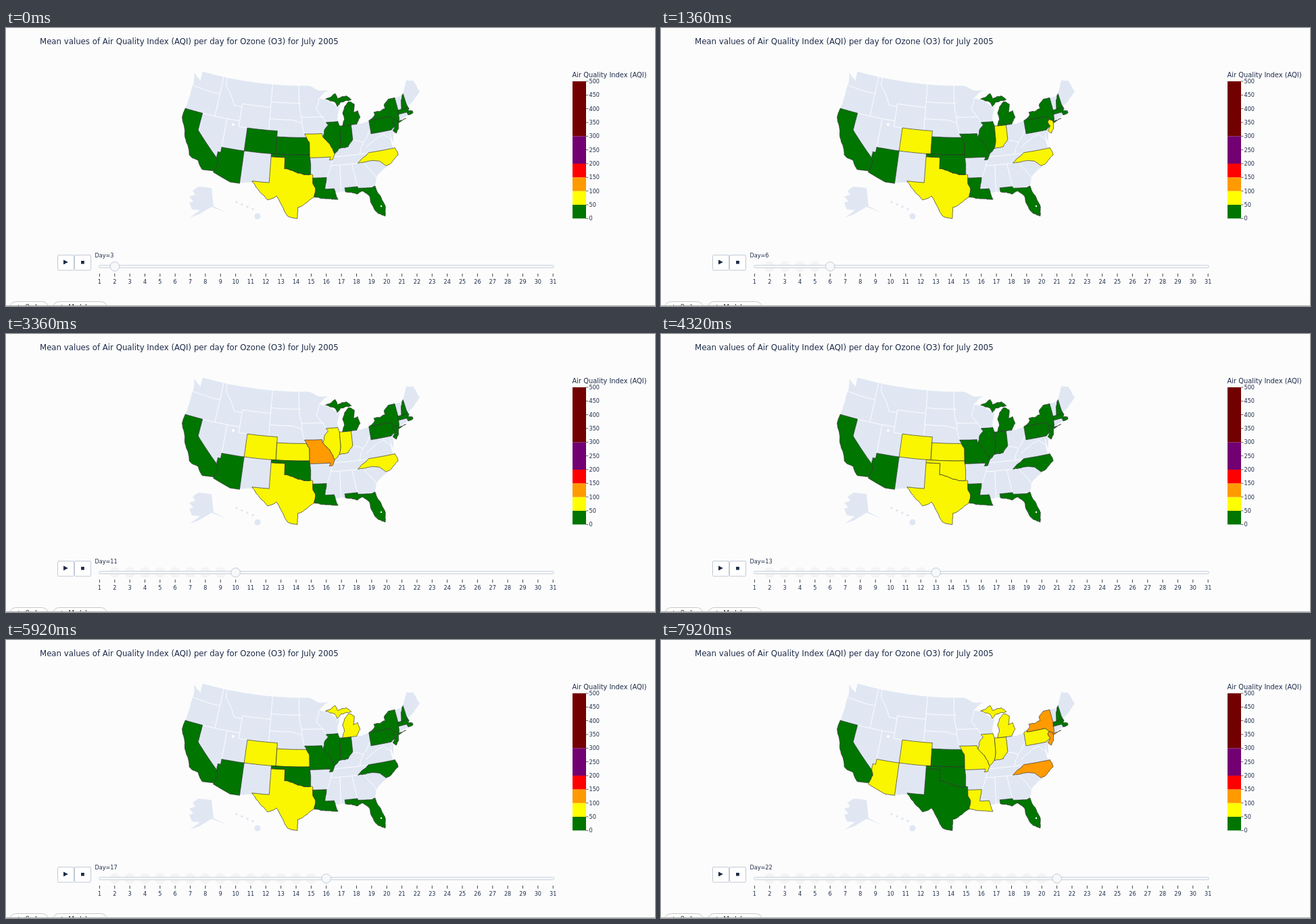
An HTML page that plays this animation: 960 by 412 pixels, repeating every 8 s.

```html
<!DOCTYPE html>
<html lang="en">
<head>
<meta charset="utf-8">
<title>Air quality by day</title>
<style>
html, body { margin: 0; width: 100%; height: 100%; overflow: hidden; background: #fcfcfc; }
svg { display: block; width: 100%; height: 100%; }
text { font-family: "DejaVu Sans", sans-serif; fill: #1d2b48; font-size: 8.1px; }
.mid { text-anchor: middle; }
.pill { font-family: Roboto, sans-serif; font-size: 9.6px; fill: #222; }
</style>
</head>
<body>
<svg id="stage" viewBox="0 0 960 412"></svg>
<script>
const stage = document.getElementById('stage');
const GREEN = '#007500', ORANGE = '#ff9a00';
const LEVELS = { g: GREEN, y: '#f9f600', o: ORANGE };
const LAND = '#e0e7f3', INK = '#1d2b48', EDGE = '#c2cad6';

function add(tag, attrs, text) {
  const el = document.createElementNS('http://www.w3.org/2000/svg', tag);
  for (const key in attrs) el.setAttribute(key, attrs[key]);
  if (text !== undefined) el.textContent = text;
  return stage.appendChild(el);
}
const label = (x, y, text, attrs) => add('text', { x, y, ...attrs }, text);
const rect = (x, y, width, height, attrs) => add('rect', { x, y, width, height, ...attrs });
const dot = (cx, cy, r, attrs) => add('circle', { cx, cy, r, ...attrs });

// Albers conic projection; longitude is given in degrees west
function project([west, lat]) {
  const rad = Math.PI / 180, n = 0.602835;
  const rho = 488 * Math.sqrt(1.35122 - 2 * n * Math.sin(lat * rad)) / n;
  const a = n * (96 - west) * rad;
  return [439.9 + rho * Math.sin(a), rho * Math.cos(a) - 452.2];
}

// Splits an edge at its middle; a natural edge is also bent there.
// The bend depends on the two ends only, so neighbours share it.
function split(a, b, natural, depth) {
  if (!depth) return [b];
  const sx = a[0] + b[0], sy = a[1] + b[1], angle = sx * 91 + sy * 37;
  const bend = natural ? 0.06 * Math.hypot(a[0] - b[0], a[1] - b[1]) : 0;
  const mid = [sx / 2 + bend * Math.sin(angle), sy / 2 + bend * Math.cos(angle)];
  return [...split(a, mid, natural, depth - 1), ...split(mid, b, natural, depth - 1)];
}

// "west lat, west lat": parallels, meridians and edges to "=" points are straight
function trace(points, closed) {
  const names = points.split(',');
  if (closed) names.push(names[0]);
  const list = names.map(p => p.replace('=', '').split(' ').map(Number));
  const out = [list[0]];
  for (let i = 1; i < list.length; i++) {
    const [a, b] = [list[i - 1], list[i]];
    const natural = a[0] !== b[0] && a[1] !== b[1] && names[i][0] !== '=';
    out.push(...split(a, b, natural, 3));
  }
  return 'M' + out.map(p => project(p).map(v => v.toFixed(1)).join(' ')).join('L');
}

label(50, 24, 'Mean values of Air Quality Index (AQI) per day for Ozone (O3) for July 2005', { style: 'font-size:11.76px' });

// land
const coast = '124.7 48.4,122.6 47.3,122.75 49,95.15 49,89.5 48,92.1 46.75,90.4 46.55,87.6 45.1,88 44.5,87.1 45.2,87.9 43,87.5 41.7,83.45 41.7,80.5 42,78.9 42.85,76.2 43.5,75 45,71.5 45,69.25 47.45,67.8 47.07,67 44.85,70.6 43.1,70.6 41.6,73.9 40.8,74.9 38.95,75.4 39.5,75.95 37.15,76.2 39.4,76.35 37,76 35.6,77.95 33.9,80.9 32.05,81.45 30.7,85 30.7,89.5 30.3,93 30,98 28,103 30.5,106.5 31.78,108.2 31.5,111 31.5,114.7 33,117 33,120 35,123.4 39.5,124.2 42,124.05 44.7,124.1 46.9';
add('path', { d: trace(coast, true), fill: LAND });

// Alaska and Hawaii insets
add('path', { d: 'M285 235L304 237 307 264 327 274 304 265 286 276 272 281 287 270 275 269 271 259 277 257 271 250 280 247 276 241Z', fill: LAND });
for (let i = 0; i < 4; i++) dot(341 + 8 * i, 258 + 3.5 * i, 1.8, { fill: LAND });
dot(372, 279, 4.6, { fill: LAND });

// borders between uncoloured states
[
  '117 49,117 42', '124.2 42,111.05 42', '123.95 46.2,=119 45.95,=117 46',
  '114.05 42,114.05 37,103.05 37,103.05 32', '116.05 49,116.05 48,113 44.5,111.05 44.5',
  '104.05 45,111.05 45,111.05 41,102.05 41,102.05 40', '109.05 41,109.05 31.4',
  '104.05 49,104.05 41', '104.05 45.94,96.5 45.94', '104.05 43,98.5 43,96.5 42.5',
  '97.2 49,96.45 43.5,95.77 40.6', '96.45 43.5,91.2 43.5', '92.1 46.75,92.8 44.75,90.65 42.5',
  '89.7 36,91.17 33', '90.1 35,83.1 35,80.9 32.05', '89.5 36.5,75.85 36.5',
  '88.2 35,=88.4 30.35', '85.6 35,=85 31', '84.82 39.1,82.6 38.4,83.7 36.6',
  '82 37.5,77.75 39.3,76.3 38.05', '82.6 38.4,80.52 40.6', '75.8 39.7,=75.05 38.45'
].forEach(p => add('path', { d: trace(p), fill: 'none', stroke: '#fff', 'stroke-width': 0.9 }));

// A state's levels: one letter for each span of days
const SPANS = [2, 4, 7, 11, 14, 17, 20];
const states = [];
function state(levels, ...shapes) {
  const d = shapes.map(p => trace(p, true) + 'Z').join('');
  const el = add('path', { d, stroke: '#333', 'stroke-width': 0.7, 'stroke-linejoin': 'round' });
  states.push({ el, levels });
}
const always = 'ggggggg';
state(always, '124.2 42,120 42,120 39,=114.63 35,114.2 34.2,114.72 32.72,=117.12 32.53,118.4 33.9,120.5 34.45,122.4 37.2,124.3 40.4');
state('gggggyy', '109.05 37,109.05 31.33,111.07 31.33,=114.8 32.5,114.72 32.72,114.2 34.2,114.63 35,114.7 36.1,114.05 36.1,114.05 37');
state('gyyyyyy', '109.05 41,102.05 41,102.05 37,109.05 37');
state('ggyyygg', '102.05 40,95.3 40,94.62 39.1,94.62 37,102.05 37');
state('yyyyygg', '103.05 36.5,100 36.5,100 34.55,97.2 33.85,94.48 33.63,94.04 33.55,94.04 32,93.55 31.2,93.85 29.7,97.1 27.9,97.15 25.95,99.1 26.4,101.4 29.77,103.15 28.98,104.7 30.2,106.6 32,103.05 32');
state('gggyggg', '103.05 37,94.62 37,=94.43 35.4,=94.48 33.63,97.2 33.85,100 34.55,100 36.5,103.05 36.5');
state('ygogggy', '95.77 40.6,91.73 40.6,91.5 40,90.1 38.8,89.1 37,89.7 36,90.37 36,90.1 36.5,94.62 36.5,94.62 39.1,95.3 40');
state('ggggggy', '94.04 33,91.17 33,91.6 31,89.75 31,89.5 30.1,89.1 29.1,91 29.3,93.85 29.7,93.55 31.2,94.04 32');
state('ggygggy', '90.65 42.5,87.8 42.5,87.53 41.7,87.53 39.35,88 37.85,89.1 37,90.1 38.8,91.5 40,91.1 41.2,90.15 42');
state('gyygggy', '87.53 41.7,84.8 41.7,=84.82 39.1,86 38,88 37.85,87.53 39.35');
state('ggggyyy',
  '90.4 46.55,87.9 47.4,87.4 46.5,85 46.75,84 46,86.7 45.8,87.6 45.1,88.1 45.9',
  '86.8 41.7,86.2 42.8,86.5 43.9,85.9 44.9,84.75 45.75,83.4 45.2,83.9 43.7,82.8 44,82.45 42.8,83.45 41.7');
state(always, '87.6 31,85 31,=84.86 30.7,=82.1 30.5,81.45 30.7,80.55 28.4,80.05 26.8,80.4 25.2,81.7 25.9,82.7 27.8,82.8 29,84 30.1,85.3 29.7,87.5 30.3');
state('yyygggo', '84.3 35,82.3 35.1,81.05 35.1,=79.67 34.8,=78.55 33.85,77.95 33.9,76.5 34.65,75.5 35.25,75.85 36.55,81.68 36.55');
state('gggggyo', '79.76 42.2,78.9 42.85,79.05 43.27,76.2 43.5,76.3 44.1,75 45,73.35 45,=73.25 42.75,=73.5 41.2,=73.7 40.9,71.9 41.07,74 40.57,=73.9 41,=74.7 41.36,75.35 42,79.76 42');
state('ggggggy', '80.52 42,80.52 39.7,75.8 39.7,74.75 40.2,75.1 41,74.7 41.36,75.35 42,79.76 42,79.76 42.2');
state('gygggyo', '74.7 41.36,=73.9 41,74.1 39.7,74.9 38.95,75.5 39.5,74.75 40.2,75.1 41');
state(always, '71.5 45,71.1 45.3,=70.97 43.4,=70.8 42.85,=72.45 42.73,=72 44.2');
state(always, '73.25 42.75,=70.8 42.85,70.6 42.6,71 42.2,70 42,70 41.65,71.2 41.5,=71.4 42.05,73.5 42.05');

// lakes
dot(555, 264, 1.2, { fill: '#fff' });
dot(336, 143, 2, { fill: '#fff' });

// colour scale
label(837.5, 73, 'Air Quality Index (AQI)', { style: 'font-size:9.85px' });
const scaleY = v => 282.3 - v * 0.4066;
[[0, 50, GREEN], [50, 100, '#ffff00'], [100, 150, ORANGE], [150, 200, '#ff0000'],
 [200, 300, '#720072'], [300, 500, '#720000']].forEach(([a, b, fill]) =>
  rect(838, scaleY(b), 20, scaleY(a) - scaleY(b), { fill }));
for (let v = 0; v <= 500; v += 50) {
  rect(858, scaleY(v) - 0.4, 3.4, 0.8, { fill: '#444' });
  label(862.5, scaleY(v) + 3, v);
}

// buttons
for (const x of [76.5, 101.5]) rect(x, 336.5, 24, 22.5, { rx: 1.5, fill: '#fff', stroke: EDGE });
add('path', { d: 'M85 343.5L91.8 347 85 350.5Z', fill: INK });
rect(111, 345, 4.8, 4.6, { fill: INK });

// slider
const stopX = day => 138.4 + 22.36 * (day - 1);
const trail = [];
for (let day = 2; day < 22; day++) trail.push({ day, el: dot(stopX(day), 353.5, 8, { fill: '#f4f4f4' }) });
rect(137.5, 351.7, 673, 3.6, { rx: 1.8, fill: '#f8fafc', stroke: EDGE, 'stroke-width': 0.9 });
for (let day = 1; day <= 31; day++) {
  rect(stopX(day) - 0.5, 364, 1, 4.5, { fill: '#444' });
  label(stopX(day), 379, day, { class: 'mid' });
}
const handle = dot(0, 353.5, 6.8, { fill: '#f6f8fa', stroke: EDGE });
const dayText = label(131.5, 340, '');

// cut-off pills at the bottom
for (const [x, w, text] of [[5, 58, 'Code'], [69, 81, 'Markdown']]) {
  rect(x + 0.5, 405.5, w - 1, 18, { rx: 9, fill: '#fff', stroke: '#c8c8c8' });
  label(x + 11, 416.3, '+', { class: 'pill' });
  label(x + 23.5, 416.3, text, { class: 'pill' });
}
rect(0, 411, 960, 1, { fill: '#b0b0b0' });

// The label changes first; the handle and the map follow after LAG
const LOOP = 8000, STEP = 420.3, LEAD = 80, LAG = 122, GLIDE = 50;
function draw(now) {
  const t = now % LOOP + LEAD;
  const day = 3 + Math.floor(t / STEP);
  const k = Math.min(1, Math.max(0, (t % STEP - LAG) / GLIDE));
  const ease = k < 0.5 ? 4 * k ** 3 : 1 - 4 * (1 - k) ** 3;
  const at = day - 1 + ease;
  const span = SPANS.filter(s => s <= Math.round(at)).length - 1;

  states.forEach(s => s.el.setAttribute('fill', LEVELS[s.levels[span]]));
  trail.forEach(s => s.el.setAttribute('visibility', s.day < at - 0.2 ? 'visible' : 'hidden'));
  handle.setAttribute('cx', stopX(at));
  dayText.textContent = 'Day=' + day;
}
const start = performance.now();
function tick() {
  draw(performance.now() - start);
  requestAnimationFrame(tick);
}
tick();
</script>
</body>
</html>
```
